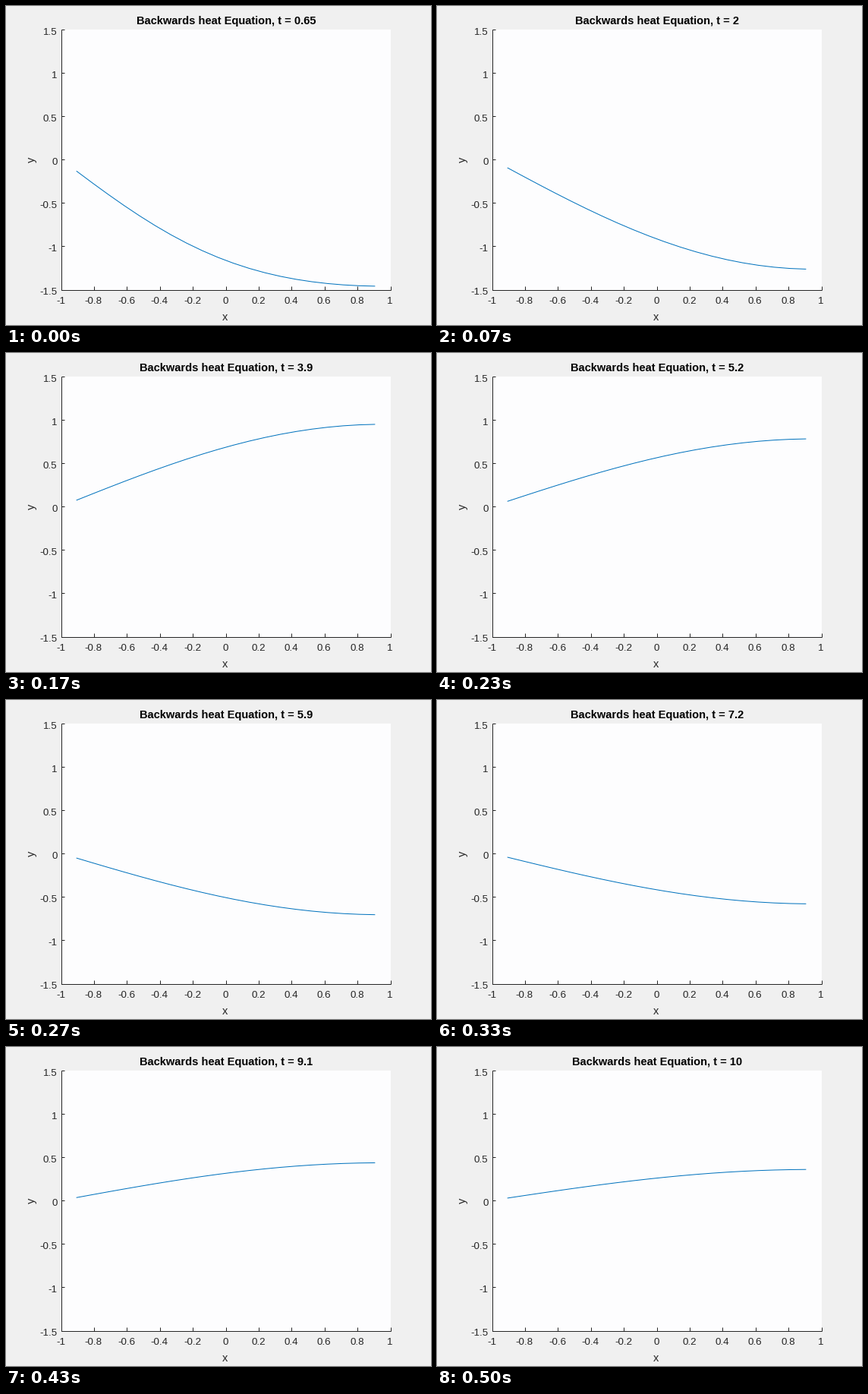
Recreate the animation shown at these times as a matplotlib script. Size 560 by 420 pixels, loop 530 ms.

```python
import numpy as np
import matplotlib.pyplot as plt
from matplotlib.animation import FuncAnimation
from matplotlib.patches import Rectangle

W, H, DPI = 560, 420, 80
LEFT, RIGHT, TOP, BOTTOM = 72.5, 506.5, 30.5, 373.5
INK = "#262626"

plt.rcParams["font.family"] = "Liberation Sans"


def pt(px):
    return px * 72 / DPI


def to_x(x):
    return LEFT + (x + 1) / 2 * (RIGHT - LEFT)


def to_y(y):
    return BOTTOM - (y + 1.5) / 3 * (BOTTOM - TOP)


fig = plt.figure(figsize=(W / DPI, H / DPI), dpi=DPI, facecolor="#f0f0f0")
ax = fig.add_axes([0, 0, 1, 1])
ax.set(xlim=(0, W), ylim=(H, 0))
ax.axis("off")


def label(x, y, text, px=13.33, **style):
    style = {"ha": "center", "va": "baseline", "color": INK, **style}
    return ax.text(x, y, text, fontsize=pt(px), **style)


def rule(xs, ys):
    ax.plot(xs, ys, color=INK, lw=pt(1), solid_capstyle="butt")


# Plot area, axes and ticks
ax.add_patch(Rectangle((LEFT + 0.5, TOP + 0.5), RIGHT - LEFT, BOTTOM - TOP,
                       facecolor="#fdfdfe", lw=0))
rule([LEFT, RIGHT + 0.5], [BOTTOM, BOTTOM])
rule([LEFT, LEFT], [BOTTOM, TOP])

for i in range(-5, 6):
    x = to_x(i / 5)
    rule([x, x], [BOTTOM, BOTTOM - 4.5])
    label(x - 0.5, 392, f"{i / 5:g}")
for i in range(-3, 4):
    y = to_y(i / 2)
    rule([LEFT, LEFT + 4.5], [y, y])
    label(67.5, y + 7, f"{i / 2:g}", ha="right")

label(289, 413.5, "x", 14.67)
label(38, 202.5, "y", 14.67, rotation=90, rotation_mode="anchor")
title = label(290, 24, "", 14.67, color="black", weight="bold")

# Interior grid points, fixed at the left end and insulated at the right
s = 2 * np.arange(1, 21) / 21
k = np.pi / 2 / (41 / 21)
curve, = ax.plot([], [], color="#0072bd", lw=pt(1))


def solution(step):
    slow = 1.54 * np.exp(-0.0975 * step) * np.sin(k * s)
    fast = 0.08 * np.exp(-1.6 * step) * np.sin(3 * k * s)
    return -(-1) ** step * (slow + fast)


def update(tick):
    step = (3 * tick + 1) // 10  # steps last 30 or 40 ms
    curve.set_data(to_x(s - 1), to_y(solution(step)))
    title.set_text(f"Backwards heat Equation, t = {0.65 * (step + 1):.2g}")
    return curve, title


anim = FuncAnimation(fig, update, frames=53, interval=10, repeat=True,
                     repeat_delay=0, cache_frame_data=False)
plt.show()
```
